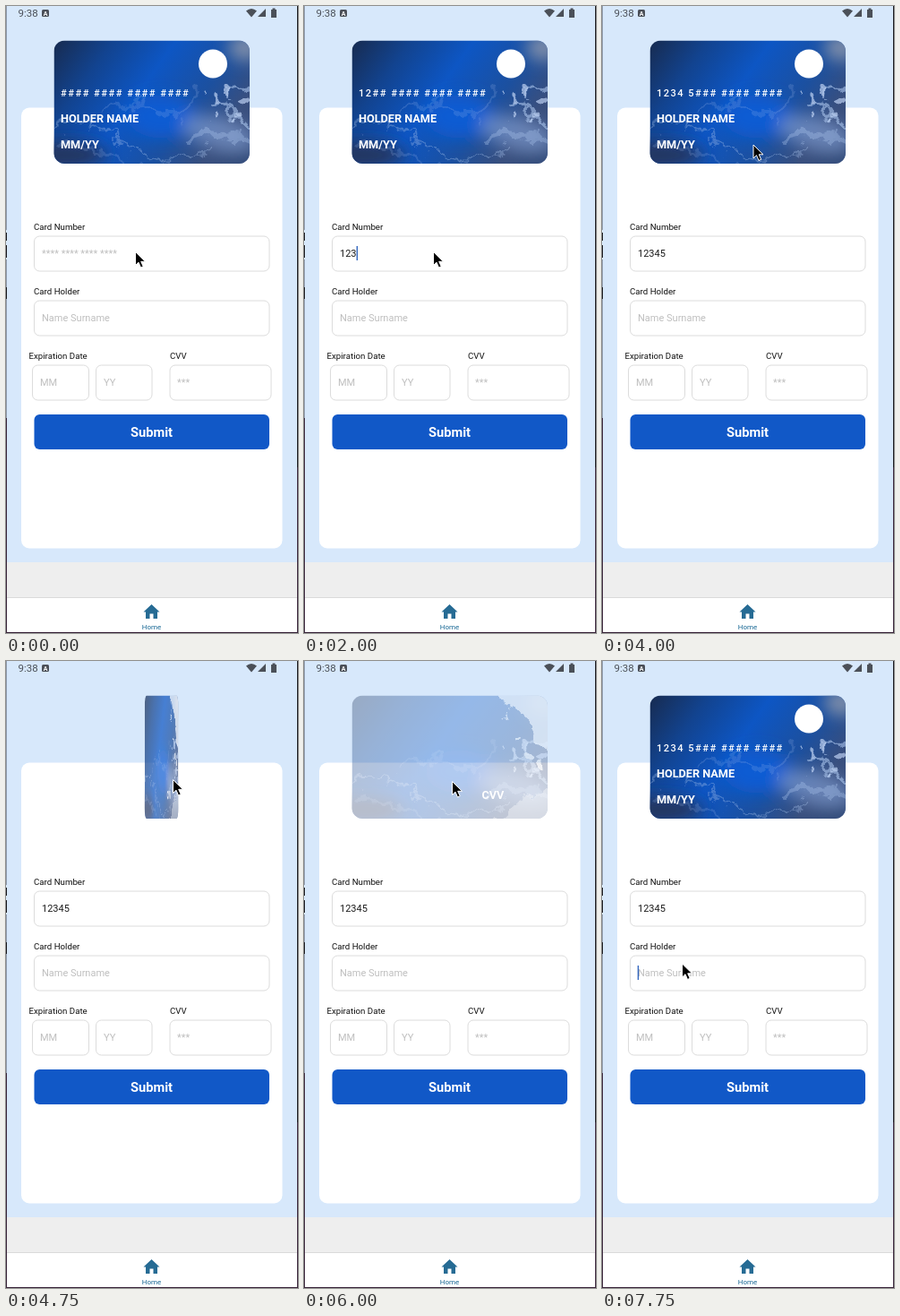
An HTML page for the animation above (8000 ms loop, 326 by 700 pixels).

```html
<!DOCTYPE html>
<html lang="en">
<head>
<meta charset="utf-8">
<title>Card form</title>
<style>
  html, body { margin: 0; width: 100%; height: 100%; overflow: hidden; }
  svg { display: block; width: 326px; height: 700px; font-family: Roboto, sans-serif; }
  .field { fill: #fff; stroke: #dcdcdc; }
  .label { font-size: 9.7px; fill: #111; }
  .value { font-size: 11px; fill: #1c1c1c; }
  .hint { font-size: 11px; fill: #bfbfbf; }
  .face { font-size: 12.7px; font-weight: 700; fill: #fff; }
  .digits { font-size: 11px; font-weight: 500; letter-spacing: 1.5px; fill: #fff; }
</style>
</head>
<body>
<svg viewBox="0 0 326 700">
  <defs>
    <clipPath id="cardShape"><rect width="218.5" height="137.5" rx="12"/></clipPath>
    <linearGradient id="sea" x1="0" y1="0" x2="1" y2=".45">
      <stop offset="0" stop-color="#172b50"/>
      <stop offset=".25" stop-color="#12438f"/>
      <stop offset=".52" stop-color="#0d56c4"/>
      <stop offset=".8" stop-color="#1c509f"/>
      <stop offset="1" stop-color="#394f7e"/>
    </linearGradient>
    <filter id="marble" filterUnits="userSpaceOnUse" x="-30" y="-30" width="280" height="200" color-interpolation-filters="sRGB">
      <feTurbulence type="fractalNoise" baseFrequency=".045" numOctaves="4" seed="8" result="noise"/>
      <feGaussianBlur in="SourceGraphic" stdDeviation=".7"/>
      <feDisplacementMap in2="noise" scale="32" xChannelSelector="R" yChannelSelector="G"/>
    </filter>
    <filter id="soft" x="-50%" y="-50%" width="200%" height="200%"><feGaussianBlur stdDeviation="9"/></filter>
    <g id="art">
      <rect width="218.5" height="137.5" fill="url(#sea)"/>
      <g filter="url(#soft)">
        <ellipse cx="12" cy="128" rx="48" ry="14" fill="#26365c"/>
        <ellipse cx="120" cy="85" rx="38" ry="24" fill="#0b5bd3"/>
        <ellipse cx="184" cy="103" rx="42" ry="18" fill="#7894c8" opacity=".75" transform="rotate(14 184 103)"/>
        <ellipse cx="208" cy="133" rx="32" ry="9" fill="#2f4878"/>
        <ellipse cx="213" cy="8" rx="18" ry="14" fill="#8190ab"/>
      </g>
      <g filter="url(#marble)" fill="none" stroke="#a9c3ec">
        <path d="M-8 98Q40 85 65 108T120 132T175 118" stroke-width="2" opacity=".35"/>
        <path d="M-5 122Q45 107 95 145M50 80Q85 60 115 78T160 55" stroke-width="4" opacity=".18"/>
        <path d="M175 72Q193 65 198 82T225 98M195 65Q205 48 222 55" stroke-width="4" opacity=".6"/>
        <path d="M145 112Q175 92 224 118" stroke-width="8" opacity=".35"/>
        <g fill="#b9cef0" stroke="none" opacity=".7">
          <circle cx="198" cy="57" r="5"/><circle cx="186" cy="67" r="3"/>
          <circle cx="211" cy="70" r="6"/><circle cx="178" cy="83" r="3"/>
          <circle cx="204" cy="88" r="4"/><circle cx="169" cy="63" r="2"/>
        </g>
      </g>
    </g>
  </defs>

  <rect width="326" height="700" fill="#d7e8fb"/>
  <g fill="#4b5058">
    <text x="13.5" y="12" font-size="11.5">9:38</text>
    <rect x="40" y="4" width="8" height="8" rx="1.5"/>
    <path d="M268 5.5Q274 .5 280 5.5L274 12.5ZM290 3V12H281ZM296 4H297.500V2.500H300.500V4H302V13H296Z"/>
  </g>
  <text x="44" y="10.500" font-size="7" font-weight="700" text-anchor="middle" fill="#fff">A</text>

  <rect x="17" y="113.500" width="291.500" height="492" rx="9" fill="#fff"/>
  <g class="label">
    <text x="31" y="250">Card Number</text>
    <text x="31" y="322">Card Holder</text>
    <text x="25.500" y="394">Expiration Date</text>
    <text x="183" y="394">CVV</text>
  </g>
  <g class="field">
    <rect x="31.500" y="257" width="262.500" height="39" rx="6"/>
    <rect x="31.500" y="329" width="262.500" height="39" rx="6"/>
    <rect x="29.500" y="401" width="63" height="39" rx="6"/>
    <rect x="100.500" y="401" width="62.500" height="39" rx="6"/>
    <rect x="183" y="401" width="113" height="39" rx="6"/>
  </g>
  <g class="hint">
    <text x="40" y="280" id="numberHint">**** **** **** ****</text>
    <text x="40" y="352">Name Surname</text>
    <text x="38" y="424">MM</text>
    <text x="109" y="424">YY</text>
    <text x="191" y="424">***</text>
  </g>
  <text x="40" y="280" class="value" id="number"></text>
  <rect id="caret" width="1.400" height="16" fill="#3468c0"/>
  <rect x="31.500" y="456" width="262.500" height="39" rx="6" fill="#1158c7"/>
  <text x="162.500" y="481" font-size="14.7" font-weight="700" text-anchor="middle" fill="#fff">Submit</text>

  <rect y="621" width="326" height="39" fill="#eee"/>
  <rect y="660" width="326" height="40" fill="#fff"/>
  <path d="M0 660.500H326" stroke="#dadada"/>
  <path d="M162.500 668L171.500 676.500H169V684H164.500V678.500H160.500V684H156V676.500H153.500Z" fill="#266b94"/>
  <text x="162.500" y="695.500" font-size="8" text-anchor="middle" fill="#1b6a96">Home</text>

  <g id="card">
    <g clip-path="url(#cardShape)">
      <use href="#art"/>
      <g id="front">
        <circle cx="177.500" cy="26" r="16" fill="#fff"/>
        <text x="7.500" y="62.500" class="digits" id="cardDigits"></text>
        <text x="7.500" y="91.500" class="face">HOLDER NAME</text>
        <text x="7.500" y="120.500" class="face">MM/YY</text>
      </g>
      <g id="back">
        <g filter="url(#marble)" fill="#fff" opacity=".75">
          <path d="M165 -10H235V75Q212 65 204 45T175 18Z"/>
          <circle cx="197" cy="69" r="5"/><circle cx="210" cy="82" r="6"/><circle cx="184" cy="51" r="3"/>
          <path d="M150 150Q185 105 235 102V150Z" opacity=".5"/>
        </g>
        <text x="145" y="115.500" class="face">CVV</text>
      </g>
    </g>
  </g>

  <path d="M.5 0V250M.5 283V460" stroke="#8c98a8"/>
  <path d="M.5 253V262M.5 267V281M.5 314V327M325.500 0V515" stroke="#15151a"/>
  <path d="M.5 460V700M325.500 515V700M0 699.500H326" stroke="#372238"/>
  <path id="cursor" d="M0 0V15L3.500 11.700L6 17.500L8.700 16.300L6.200 10.800H11Z" stroke="#fff"/>
</svg>

<script>
const LOOP = 8000;
const CARD = { x: 53.5, y: 38.5, width: 218.5 };
const KEY_TIMES = [1380, 1750, 2000, 2250, 2600];
const CARD_LAG = 120;
const FLIPS = [4507, 5865];
const FADE = 200, TURN = 400;
const FOCUS = [
  { from: 500, to: 3500, field: 'number' },
  { from: 6500, to: 7450, field: 'number' },
  { from: 7450, to: LOOP, field: 'holder' }
];
// time, x, y of the pointer tip
const POINTER = [
  [0, 144.5, 274.5], [3000, 144.5, 274.5], [3800, 169, 155], [4200, 169, 155],
  [4700, 186.5, 132.5], [5100, 186.5, 132.5], [5700, 165.5, 134.5], [6050, 165.5, 134.5],
  [6500, 135.5, 258], [6750, 135.5, 258], [7400, 89.5, 338], [LOOP, 89.5, 338]
];

const $ = id => document.getElementById(id);
const show = (id, on) => $(id).setAttribute('visibility', on ? 'visible' : 'hidden');
const smooth = p => p * p * (3 - 2 * p);
const typedAt = t => '12345'.slice(0, KEY_TIMES.filter(k => k <= t).length);

function pointerAt(t) {
  const i = POINTER.findIndex(p => p[0] > t);
  const [t0, x0, y0] = POINTER[i - 1], [t1, x1, y1] = POINTER[i];
  const p = smooth((t - t0) / (t1 - t0));
  return [x0 + (x1 - x0) * p, y0 + (y1 - y0) * p];
}

// One face fades out flat, then the other turns in from edge-on.
function cardAt(t) {
  const started = FLIPS.filter(f => f <= t);
  const age = started.length ? t - started.at(-1) : Infinity;
  const fading = age < FADE;
  const turn = fading ? 1 : Math.min(1, (age - FADE) / TURN);
  return {
    back: (started.length - (fading ? 1 : 0)) % 2 === 1,
    angle: (1 - turn) * Math.PI / 2,
    opacity: fading ? 1 - age / FADE : 0.68 + 0.32 * turn
  };
}

function drawCard(t) {
  const { back, angle, opacity } = cardAt(t);
  const scale = Math.max(0.001, Math.cos(angle));
  const x = CARD.x + CARD.width / 2 * (1 - scale) + 11 * Math.sin(angle);
  $('card').setAttribute('transform', `translate(${x} ${CARD.y}) scale(${scale} 1)`);
  $('card').setAttribute('opacity', opacity);
  show('front', !back);
  show('back', back);
  const typed = typedAt(t - CARD_LAG);
  $('cardDigits').textContent = '#### #### #### ####'.replace(/#/g, (() => {
    let i = 0;
    return () => typed[i++] || '#';
  })());
}

function drawForm(t) {
  const typed = typedAt(t);
  $('number').textContent = typed;
  show('numberHint', !typed);

  const focus = FOCUS.find(f => t >= f.from && t < f.to);
  if (!focus) return show('caret', false);
  const lastAction = Math.max(focus.from, ...KEY_TIMES.filter(k => k <= t));
  const inNumber = focus.field === 'number';
  $('caret').setAttribute('x', 39.7 + (inNumber ? typed.length * 6.3 : 0));
  $('caret').setAttribute('y', inNumber ? 268 : 340);
  show('caret', (t - lastAction) % 1000 < 500);
}

function frame() {
  const t = performance.now() % LOOP;
  drawForm(t);
  drawCard(t);
  $('cursor').setAttribute('transform', `translate(${pointerAt(t)})`);
  requestAnimationFrame(frame);
}
frame();
</script>
</body>
</html>
```
